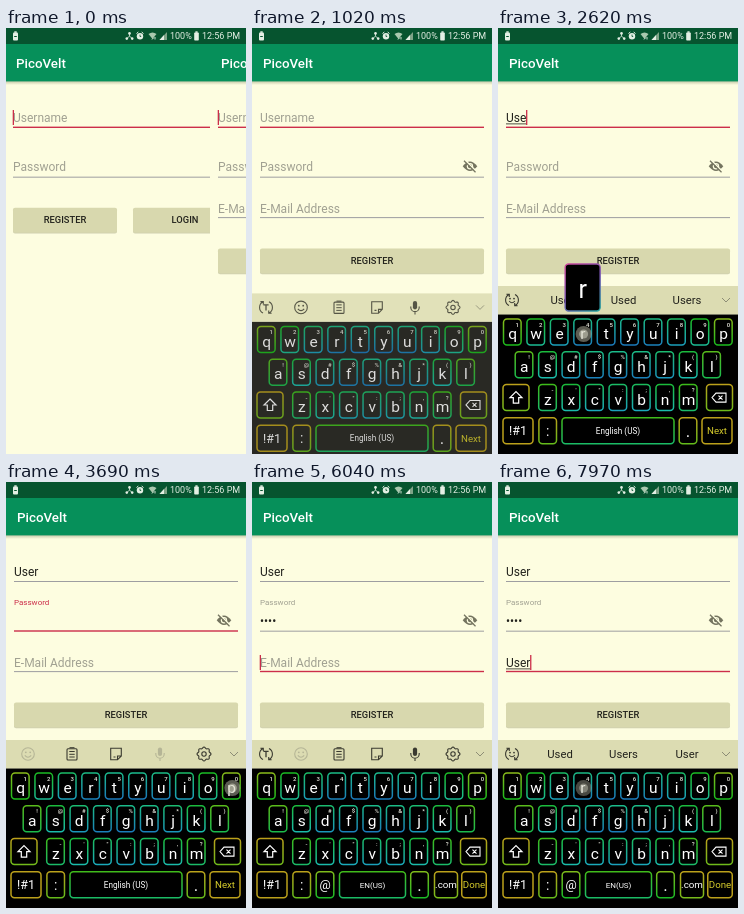
An HTML page with a canvas for the animation above (8 s loop, 240 px wide and 426 px high).

```html
<!DOCTYPE html>
<html lang="en">
<head>
<meta charset="utf-8">
<title>Sign-up form</title>
<style>
html, body { margin: 0; width: 100%; height: 100%; overflow: hidden; }
canvas { display: block; width: 240px; height: 426px; }
</style>
</head>
<body>
<canvas id="stage"></canvas>
<script>
const LOOP = 8000, W = 240, H = 426, PRESS = 110, FADE = 110;
const PAPER = '#fdfde0', PANEL = '#dcdcb2', BAR = '#06905a', STATUS = '#06542f';
const INK = '#22221c', HINT = '#a1a192', LINE = '#93939a', ACCENT = '#cc2e4a', KEY_TEXT = '#d6cc2c';

const canvas = document.getElementById('stage');
const g = canvas.getContext('2d');
const dpr = window.devicePixelRatio || 1;
canvas.width = W * dpr;
canvas.height = H * dpr;

const clamp = v => Math.max(0, Math.min(1, v));
const smooth = p => p * p * (3 - 2 * p);
const mix = (a, b, p) => a + (b - a) * p;

// Each field: focus time and typed characters with their release times.
const username = { focus: 100, blur: 3090, keys: [[1970, 'U'], [2200, 's'], [2430, 'e'], [2680, 'r']] };
const password = { focus: 3090, blur: 5040, keys: [[3800, 'p'], [4130, 'a'], [4460, 's'], [4760, 's']] };
const email = { focus: 5040, blur: LOOP, keys: [[6980, 'U'], [7350, 's'], [7640, 'e'], [7930, 'r']] };
const shifts = [[1600, 'shift'], [6420, 'shift']];
const taps = [...shifts, ...username.keys, ...password.keys, ...email.keys];
const fieldTaps = [[3090, 120, 138], [5040, 120, 180]];
const EMAIL_LAYOUT = 5240;
const SUGGESTIONS = [null, ['U', 'You', 'Up'], ['Us', 'Use', 'Used'], ['Use', 'Used', 'Users'], ['Used', 'Users', 'User']];

const rows = [
  { chars: 'qwertyuiop', hints: '1234567890', x: 14.3, y: 304 },
  { chars: 'asdfghjkl', hints: '!@#$%&*()', x: 26, y: 336.8 },
  { chars: 'zxcvbnm', hints: '-\'":;,?', x: 49.5, y: 369.6 }
];
const PITCH = 23.45, BOTTOM_ROW = 402.8;

function text(str, x, y, size, color, align = 'left', weight = 400) {
  g.font = `${weight} ${size}px Roboto, sans-serif`;
  g.textAlign = align;
  g.fillStyle = color;
  g.fillText(str, x, y);
  return g.measureText(str).width;
}
function rect(x, y, w, h, color) {
  g.fillStyle = color;
  g.fillRect(x, y, w, h);
}
function box(x, y, w, h, r, fill, stroke, width = 1) {
  g.beginPath();
  g.roundRect(x, y, w, h, r);
  if (fill) { g.fillStyle = fill; g.fill(); }
  if (stroke) { g.strokeStyle = stroke; g.lineWidth = width; g.stroke(); }
}
function path(d, x, y, color, width = 1, fill = false) {
  g.save();
  g.translate(x, y);
  const p = new Path2D(d);
  if (fill) { g.fillStyle = color; g.fill(p); }
  else { g.strokeStyle = color; g.lineWidth = width; g.stroke(p); }
  g.restore();
}
function disc(x, y, r, color) {
  g.beginPath();
  g.arc(x, y, r, 0, 7);
  g.fillStyle = color;
  g.fill();
}

function typed(field, t) {
  return field.keys.filter(([at]) => at <= t).map(([, c]) => c).join('');
}
function cursorOn(field, t) {
  if (t < Math.max(0, field.focus - 100) || t >= field.blur) return false;
  const last = field.keys.filter(([at]) => at <= t).pop();
  const since = Math.max(0, t - (last ? last[0] : field.focus));
  return Math.floor(since / 500) % 2 === 0;
}
function focused(field, t) {
  return t < field.blur && (t >= field.focus || field === username);
}

function statusBar() {
  rect(0, 0, W, 16, STATUS);
  const c = '#e4efe4';
  box(7, 4.5, 5, 8, 1, c);
  rect(8.3, 3.3, 2.4, 1.5, c);
  rect(8.2, 8, 2.6, 1, STATUS);
  path('M0 -2V0L-2.5 2.5M0 0L2.5 2.5', 123.5, 8, c, .8);
  for (const [x, y] of [[0, -2.6], [-2.7, 2.6], [2.7, 2.6]]) disc(123.5 + x, 8 + y, 1.3, c);
  disc(134, 8.3, 3.2, c);
  path('M-3.5 -2.5L-1.7 -4M3.5 -2.5L1.7 -4', 134, 8, c, 1);
  path('M0 -1.4V.5H1.2', 134, 8, STATUS, .8);
  path('M-4 -2Q0 -5 4 -2L0 3Z', 146.5, 8, '#a9c8ae', 1, true);
  path('M-2 3.5l1.7 -1.7M1 3.5V1', 148, 8, c, .9);
  path('M-3.5 4H4V-4Z', 157, 8, '#7fa488', 1, true);
  path('M-3.5 4H1V-1Z', 157, 8, c, 1, true);
  text('100%', 164, 11.4, 9, c);
  box(188.2, 4.5, 4.6, 8, .8, c);
  rect(189.4, 3.3, 2.2, 1.5, c);
  text('12:56 PM', 196, 11.4, 9, c);
}

function button(label, x, y, w) {
  box(x, y + .8, w, 25, 2, 'rgba(90,90,50,.28)');
  box(x, y, w, 25, 2, '#d8d8ae');
  text(label, x + w / 2, y + 15.3, 9.33, INK, 'center', 500);
}

function field(f, t, hint, baseline, lineY, value, { composing, floating = 0 } = {}) {
  const active = focused(f, t);
  rect(8, lineY - (active ? .7 : .3), 224, active ? 1.4 : .9, active ? ACCENT : LINE);
  if (floating || !value)
    text(hint, 8, mix(baseline, baseline - 20, floating), mix(12, 8, floating),
      floating && active ? ACCENT : HINT);
  const w = value ? text(value, 8, baseline, 12, INK) : 0;
  if (composing && value) rect(8, baseline + 1.5, w, .8, INK);
  if (cursorOn(f, t)) rect(7.7 + w, baseline - 12, 1.3, 15, ACCENT);
}

function eyeOff(x, y) {
  const c = '#74745f';
  path('M-7.3 0Q0 -9.6 7.3 0Q0 9.6 -7.3 0Z', x, y, c, 1, true);
  disc(x, y, 3.2, PAPER);
  disc(x, y, 2, c);
  path('M-5 -6.2L6.5 5.2', x, y, PAPER, 1.6);
  path('M-6 -5.6L5.5 5.9', x, y, c, 1.3);
}

function page(t, x, isRegister) {
  g.save();
  g.translate(Math.round(x), 0);
  rect(0, 16, W, H, PAPER);
  const shade = g.createLinearGradient(0, 53, 0, 57);
  shade.addColorStop(0, 'rgba(60,70,30,.3)');
  shade.addColorStop(1, 'rgba(60,70,30,0)');
  rect(0, 53, W, 4, shade);
  rect(0, 16, W, 37.4, BAR);
  text('PicoVelt', 11, 39.6, 13.33, '#fff', 'left', 500);
  if (isRegister) {
    const secret = typed(password, t), n = secret.length;
    const last = n ? password.keys[n - 1] : [0, ''];
    const shown = n && t - last[0] < 1250 ? '•'.repeat(n - 1) + last[1] : '•'.repeat(n);
    field(username, t, 'Username', 94, 99.3, typed(username, t), { composing: t < username.blur });
    field(password, t, 'Password', 143, 149, shown,
      { floating: smooth(clamp((t - password.focus) / 170)) });
    eyeOff(218, 138.3);
    field(email, t, 'E-Mail Address', 185, 189.5, typed(email, t), { composing: true });
    button('REGISTER', 8, 220.5, 224);
  } else {
    field(username, t, 'Username', 94, 99.3, '');
    field(password, t, 'Password', 143, 149, '');
    button('REGISTER', 8, 179.7, 104);
    button('LOGIN', 128, 179.7, 104);
  }
  g.restore();
}

const icons = {
  loop(x, y, c) {
    path('M-3 5.6A6.3 6.3 0 0 1 -3 -5.6M3 -5.6A6.3 6.3 0 0 1 3 5.6M-5.6 -5.8H-2.7V-3M5.6 5.8H2.7V3', x, y, c, 1.1);
  },
  translate(x, y, c) {
    icons.loop(x, y, c);
    path('M-2.6 -2.6H2.6M0 -2.6V3.2', x, y, c, 1.3);
  },
  smileLoop(x, y, c) {
    icons.loop(x, y, c);
    path('M-2.8 1Q0 4.5 2.8 1', x, y, c, 1.1);
    disc(x - 2, y - 1.4, .9, c);
    disc(x + 2, y - 1.4, .9, c);
  },
  smile(x, y, c) {
    path('M6.3 0A6.3 6.3 0 1 1 -6.3 0A6.3 6.3 0 1 1 6.3 0M-3.2 1.4Q0 5 3.2 1.4', x, y, c, 1.1);
    disc(x - 2.2, y - 1.7, .9, c);
    disc(x + 2.2, y - 1.7, .9, c);
  },
  clipboard(x, y, c) {
    box(x - 5, y - 5.3, 10, 11.3, 1, null, c, 1.1);
    path('M-2.5 -6.3H2.5M-2.7 -2.5H2.7M-2.7 .3H2.7M-2.7 3H2.7', x, y, c, 1);
  },
  sticker(x, y, c) {
    path('M-5.3 -5.7H5.3V2L1.5 5.8H-5.3ZM5.3 2H1.5V5.8M-2.5 3H-.5', x, y, c, 1.1);
  },
  mic(x, y, c) {
    box(x - 2.1, y - 6.5, 4.2, 8.5, 2.1, c);
    path('M-4.2 -1V0A4.2 4.2 0 0 0 4.2 0V-1M0 4.2V7', x, y, c, 1.1);
  },
  gear(x, y, c) {
    g.beginPath();
    for (let i = 0; i < 64; i++) {
      const a = i * Math.PI / 32, r = 6.3 + .7 * Math.cos(8 * a);
      g.lineTo(x + r * Math.cos(a), y + r * Math.sin(a));
    }
    g.closePath();
    g.strokeStyle = c;
    g.lineWidth = 1.1;
    g.stroke();
    g.beginPath();
    g.arc(x, y, 2.2, 0, 7);
    g.stroke();
  }
};

function toolbar(t) {
  rect(0, 258, W, 28.3, PANEL);
  const y = 272, on = '#3a3a30', off = '#b5b596';
  path('M-4 -2L0 2L4 -2', 228, y, '#8d8d76', 1);
  const inPassword = t >= password.focus && t < EMAIL_LAYOUT;
  const words = inPassword ? null : SUGGESTIONS[typed(t < password.focus ? username : email, t).length];
  if (words) {
    icons.smileLoop(14, y, on);
    words.forEach((word, i) => text(word, 62 + i * 63.5, y + 4.2, 11.3, INK, 'center'));
    return;
  }
  const names = ['smile', 'clipboard', 'sticker', 'mic', 'gear'];
  if (!inPassword) icons.translate(14, y, on);
  names.forEach((name, i) => {
    const disabled = name === 'smile' ? t >= password.focus : name === 'mic' && inPassword;
    icons[name](inPassword ? 22 + i * 44 : 49 + i * 38, y, disabled ? off : on);
  });
}

// Outlines run from blue in the middle through green to yellow at the lower corners.
function outline(x, y) {
  const hue = 205 - 85 * (Math.hypot(x - 120, y - 310) / 106) ** 3;
  const edge = g.createLinearGradient(0, y - 13, 0, y + 13);
  edge.addColorStop(0, `hsl(${Math.max(50, hue - 42)} 75% 42%)`);
  edge.addColorStop(1, `hsl(${Math.max(50, hue)} 75% 42%)`);
  return edge;
}

function key(x, y, w, label, size = 0, color = '#fff') {
  box(x - w / 2, y - 13, w, 26, 3.5, null, outline(x, y), 1.5);
  if (label) text(label, x, y + size * .35, size, color, 'center');
}

function keyPosition(name) {
  if (name === 'shift') return [18, 369.6];
  const row = rows.find(r => r.chars.includes(name.toLowerCase()));
  return [row.x + row.chars.indexOf(name.toLowerCase()) * PITCH, row.y];
}

function keyboard(t) {
  const caps = shifts.some(([at], i) => t >= at && t < [username, email][i].keys[0][0]);
  rect(0, 286.3, W, H, '#000');
  toolbar(t);
  rows.forEach(({ chars, hints, x, y }) => [...chars].forEach((c, i) => {
    const kx = x + i * PITCH;
    key(kx, y, 17.6);
    text(caps ? c.toUpperCase() : c, kx + .3, y + (caps ? 6.7 : 7.2), caps ? 14 : 15.5, '#fff', 'center');
    text(hints[i], kx + 5, y - 5.4, 6, '#e6e6dc', 'center', 500);
  }));

  const y = rows[2].y;
  if (caps) box(5, y - 13, 26, 26, 3.5, 'rgba(150,130,0,.5)');
  key(18, y, 26);
  path('M0 -6L6 0H2.7V5.5H-2.7V0H-6Z', 18, y, caps ? '#f0dc20' : '#fff', 1.2);
  key(221.5, y, 26);
  path('M-7 0L-3 -4.5H7V4.5H-3ZM-.5 -2L3.5 2M3.5 -2L-.5 2', 221, y, '#fff', 1.1);

  const bottomKey = (x, ...rest) => key(x, BOTTOM_ROW, ...rest);
  bottomKey(20, 30, '!#1', 12.5);
  bottomKey(49.7, 17.6, ':', 14);
  if (t >= EMAIL_LAYOUT) {
    bottomKey(73, 17.6, '@', 12.5);
    bottomKey(120.5, 66, 'EN(US)', 8);
    bottomKey(167.5, 17.6, '.', 17);
    bottomKey(194, 23, '.com', 9.8);
    bottomKey(222, 24.5, 'Done', 9.7, KEY_TEXT);
  } else {
    bottomKey(120, 112, 'English (US)', 8.2);
    bottomKey(190, 17.6, '.', 17);
    bottomKey(219, 30, 'Next', 9.7, KEY_TEXT);
  }
}

function touch(x, y, since) {
  if (since < -PRESS || since > FADE) return;
  g.globalAlpha = since < 0 ? .75 : .75 * (1 - since / FADE * .6);
  disc(x, y, 8, 'rgba(190,190,170,.65)');
  disc(x, y, 4.5, 'rgba(235,235,215,.6)');
  g.globalAlpha = 1;
}

function popup(c, x, y) {
  const px = Math.max(19, Math.min(221, x));
  const edge = g.createLinearGradient(px - 18, y - 68, px + 18, y - 20);
  edge.addColorStop(0, '#d0479a');
  edge.addColorStop(.5, '#7a58b8');
  edge.addColorStop(1, '#1fa79c');
  box(px - 17.5, y - 68, 35, 47, 3.5, '#000', edge, 1.4);
  text(c, px, y - 34.5, 25, '#fff', 'center');
}

function draw(t) {
  g.setTransform(dpr, 0, 0, dpr, 0, 0);
  const slide = smooth(clamp((t + 122) / 500));
  if (slide < 1) page(t, -8 * slide, false);
  page(t, W * (1 - slide), true);
  statusBar();

  const rise = clamp((t - 850) / 330);
  if (rise > 0) {
    g.save();
    g.globalAlpha = 1 - (1 - rise) ** 2.5;
    g.translate(0, 66 * (1 - rise) ** 3);
    keyboard(t);
    g.restore();
  }
  for (const [at, name] of taps) {
    const [x, y] = keyPosition(name), since = t - at;
    const secret = at > password.focus && at < password.blur;
    if (name !== 'shift' && !secret && since >= -PRESS && since < 0) popup(name, x, y);
    touch(x + 1, y + 2, since);
  }
  for (const [at, x, y] of fieldTaps) touch(x, y, t - at);
}

function tick(now) {
  draw(now % LOOP);
  requestAnimationFrame(tick);
}
draw(0);
requestAnimationFrame(tick);
</script>
</body>
</html>
```
